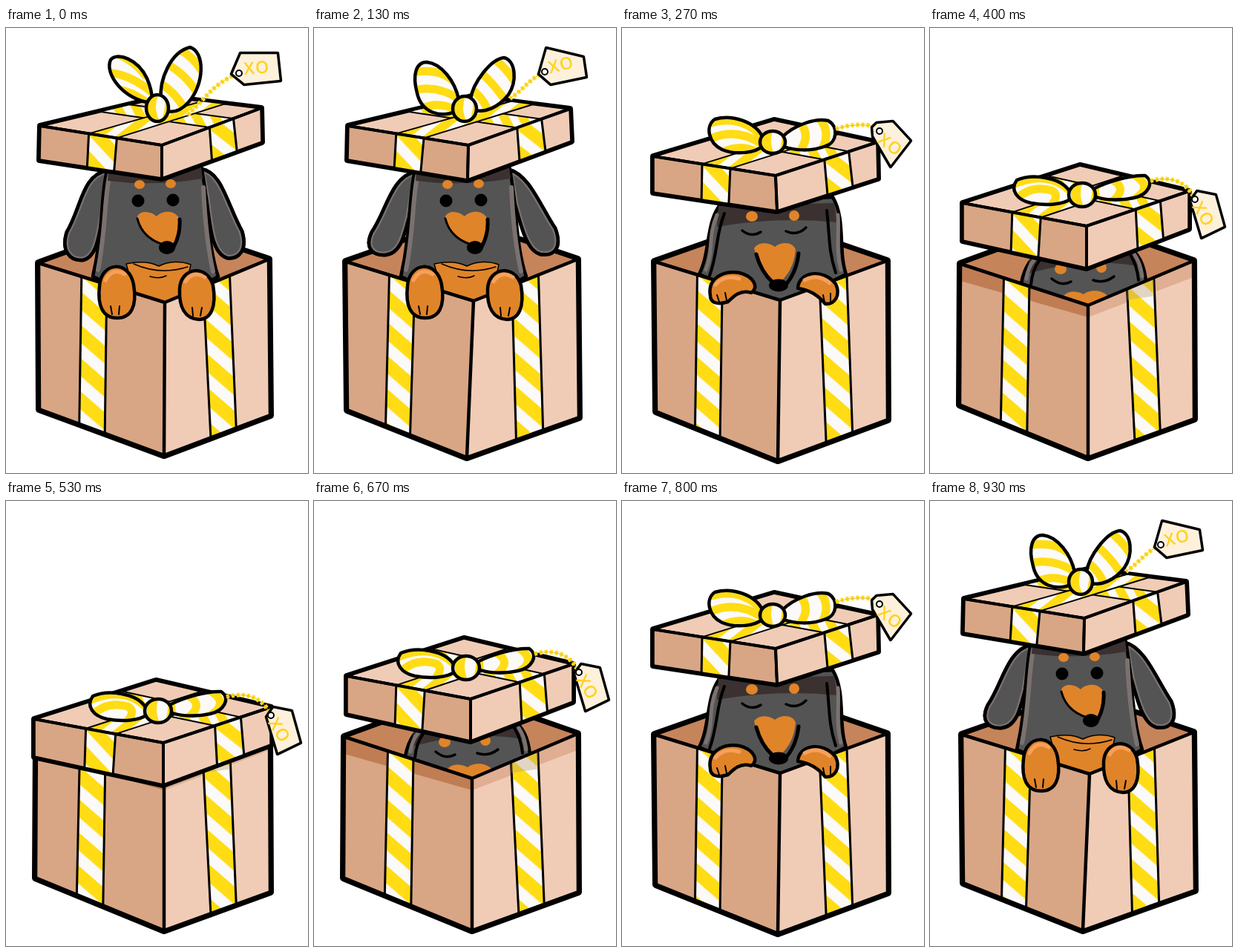
Recreate the animation shown at these times as an HTML page. Size 407 by 600 pixels, loop 1.07 s.

```html
<!DOCTYPE html>
<html lang="en">
<head>
<meta charset="utf-8">
<title>Puppy in a gift box</title>
<style>
html, body { margin: 0; width: 100%; height: 100%; overflow: hidden; background: #fff; }
svg { display: block; width: 100vw; height: 100vh; }
.pose { opacity: 0; animation: 1070ms step-end infinite; }
#tall { animation-name: tall; }
#up { animation-name: up; }
#sink { animation-name: sink; }
#peek { animation-name: peek; }
#shut { animation-name: shut; }
@keyframes tall { 0% { opacity: 1 } 12.149%, 100% { opacity: 0 } }
@keyframes up { 0% { opacity: 0 } 12.149% { opacity: 1 } 25.233% { opacity: 0 } 86.915%, 100% { opacity: 1 } }
@keyframes sink { 0% { opacity: 0 } 25.233% { opacity: 1 } 37.383% { opacity: 0 } 74.766% { opacity: 1 } 86.915%, 100% { opacity: 0 } }
@keyframes peek { 0% { opacity: 0 } 37.383% { opacity: 1 } 49.532% { opacity: 0 } 62.616% { opacity: 1 } 74.766%, 100% { opacity: 0 } }
@keyframes shut { 0% { opacity: 0 } 49.532% { opacity: 1 } 62.616%, 100% { opacity: 0 } }
</style>
</head>
<body>
<svg id="stage" viewBox="0 0 407 600" stroke-linejoin="round" stroke-linecap="round"></svg>
<script>
const C = {
  left: '#d8a685', right: '#f0ccb6', inside: '#c6845b', yellow: '#ffdc14', white: '#fbfaf8',
  coat: '#545454', shine: '#7b7270', dark: '#3a3130', tan: '#e0842a', glow: '#f6a05c', tag: '#fdf1dc'
};
let serial = 0;

const path = (d, fill, w = 4, stroke = '#000') =>
  `<path d="${d}" fill="${fill}" stroke="${stroke}" stroke-width="${w}"/>`;
const line = (d, w, stroke = '#000') => path(d, 'none', w, stroke);
const poly = (pts, fill, w) => path('M' + pts.join('L') + 'Z', fill, w);
const oval = (x, y, rx, ry, fill = '#000') =>
  `<ellipse cx="${x}" cy="${y}" rx="${rx}" ry="${ry}" fill="${fill}"/>`;
const mix = (a, b, t) => [a[0] + (b[0] - a[0]) * t, a[1] + (b[1] - a[1]) * t];

function clipped(d, inner) {
  const id = 'c' + serial++;
  return `<clipPath id="${id}"><path d="${d}"/></clipPath><g clip-path="url(#${id})">${inner}</g>`;
}

// Diagonal stripes anchored at the first corner of the quad
function ribbon(quad, angle, period, shift, w = 3) {
  const id = 's' + serial++, [x, y] = quad[0];
  return `<pattern id="${id}" width="40" height="${period}" patternUnits="userSpaceOnUse"
    patternTransform="translate(${x} ${y + shift}) rotate(${angle})">
    <rect width="40" height="${period}" fill="${C.white}"/>
    <rect width="40" height="${period * 0.54}" fill="${C.yellow}"/></pattern>` +
    poly(quad, `url(#${id})`, w);
}

// Ribbon across the strip between edge a-b and edge c-d
const strip = (a, b, c, d, [t0, t1, u0, u1], ...look) =>
  ribbon([mix(a, b, t0), mix(a, b, t1), mix(c, d, u1), mix(c, d, u0)], ...look);

function boxBack([L, F, R, LB, FB, RB]) {
  const back = [200, 260];
  return poly([L, back, R, RB, FB, LB], '#000', 10) + poly([L, back, R, F], C.inside, 4);
}

function boxFront([L, F, R, LB, FB, RB], shaded) {
  const down = ([x, y], n) => [x, y + n];
  let s = poly([L, F, FB, LB], C.left, 0) + poly([F, R, RB, FB], C.right, 0);
  if (shaded) {
    s += poly([L, F, down(F, 16), down(L, 23)], '#c07d54', 0) +
      poly([F, R, down(R, 22), down(F, 16)], '#dfae93', 0);
  }
  s += strip(L, F, LB, FB, [.34, .54, .32, .525], 41, 34, 21) +
    strip(F, R, FB, RB, [.37, .625, .44, .68], 41, 34, -4);
  if (shaded) {
    const a = mix(F, R, .37), b = mix(F, R, .625);
    s += `<path d="M${a}L${b}L${down(b, 25)}L${down(a, 15)}Z" fill="#b89a70" opacity=".38"/>`;
  }
  return s + line(`M${L}L${F}L${FB}L${LB}ZM${F}L${R}L${RB}L${FB}`, 4.5);
}

function lid([L, F, R, B, Lb, Fb, Rb]) {
  return poly([L, B, R, Rb, Fb, Lb], '#000', 8) +
    poly([L, B, R, F], C.right, 3.5) +
    strip(F, R, L, B, [.48, .72, .48, .72], 62, 22, 6, 2) +
    strip(L, F, B, R, [.4, .63, .4, .63], -38, 22, 4, 2) +
    poly([L, F, Fb, Lb], C.left, 3.5) + poly([F, R, Rb, Fb], C.right, 3.5) +
    strip(L, F, Lb, Fb, [.4, .63, .39, .61], 47, 31, 23) +
    strip(F, R, Fb, Rb, [.48, .72, .5, .75], 38, 31, 21) +
    line(`M${L}L${F}L${R}M${F}L${Fb}`, 4);
}

function bow(wings, [x, y, rx, ry]) {
  const wing = ([d, ...bands]) => path(d, C.white, 0) +
    clipped(d, bands.map(b => line(b, 11, C.yellow)).join('')) + line(d, 4.5);
  const knot = `M${x - rx},${y}a${rx},${ry} 0 1 1 ${2 * rx},0a${rx},${ry} 0 1 1 ${-2 * rx},0Z`;
  return wings.map(wing).join('') + path(knot, C.white, 0) +
    clipped(knot, line(`M${x - 4},${y - 22}Q${x - 14},${y} ${x - 2},${y + 22}`, 13, C.yellow) +
      line(`M${x + rx - 4},${y - 18}q5,12 -3,36`, 5, C.yellow)) + line(knot, 4.5);
}

function tag({ cord, shape, hole, text: [x, y, turn] }) {
  return `<path d="${cord}" fill="none" stroke="${C.yellow}" stroke-width="6" stroke-linecap="butt" stroke-dasharray="4 3"/>` +
    line(cord, 1, '#e3b63a') +
    poly(shape, '#000', 4.5) + poly(shape, C.tag, 2.5) +
    `<circle cx="${hole[0]}" cy="${hole[1]}" r="4" fill="#fff" stroke="#000" stroke-width="2"/>
    <text transform="translate(${x} ${y}) rotate(${turn})" y="8.5" text-anchor="middle"
      font-family="'Open Sans', 'Noto Sans', sans-serif" font-size="23" font-weight="600"
      letter-spacing="1.5" fill="#ffd21f">XO</text>`;
}

const sitting = ears => ears.map(d => path(d, C.coat, 5) +
    clipped(d, line(d, 9, C.shine)) + line(d, 4.5)).join('') +
  path('M137,188C127,222 132,270 117,335L175,362L214,372L240,362L286,335C271,292 273,230 263,186Z', C.coat, 4.5) +
  line('M140,196C132,230 135,270 124,326M266,215C268,260 271,292 279,328', 6, C.shine) +
  path('M138,190L263,188L265,203Q200,214 137,206Z', C.dark, 0) +
  oval(180, 211, 7, 6, C.tan) + oval(222, 210, 7, 6, C.tan) +
  oval(178, 233, 8.5, 8.5) + oval(225, 232, 8.5, 8.5) +
  path('M177,254C182,245 195,247 203,254C211,246 226,245 233,256C235,272 231,286 220,296C200,291 182,276 177,254Z', C.tan, 0) +
  line('M177,257C182,277 196,287 212,292', 3) +
  line('M234,258C235,272 232,284 226,295', 5) + oval(217, 296, 11, 9) +
  path('M162,318C180,314 194,315 206,321C220,314 236,314 249,319Q244,340 241,362L214,372L174,360Z', C.tan, 1.5) +
  line('M172,318Q208,334 245,322M194,335Q207,339 216,334', 1.5);

const bigPaws = [
  ['M126,348C128,315 166,312 172,346C177,376 168,391 150,391C130,391 123,374 126,348Z',
    'M134,340Q144,322 160,332', 'M141,375L143,386M153,375L152,386'],
  ['M234,352C235,322 271,318 279,347C284,376 276,393 260,393C241,392 233,376 234,352Z',
    'M242,342Q252,326 268,336', 'M251,377L252,388M264,377L262,388']
];
const smallPaws = [
  ['M119,361C115,339 135,326 158,330C178,335 185,350 174,357C160,352 150,362 143,369C128,374 119,370 119,361Z',
    'M126,346Q138,332 158,338', 'M128,360L131,369M139,357L141,367'],
  ['M237,351C238,328 272,324 288,345C295,360 287,373 274,372C265,361 253,353 237,351Z',
    'M246,340Q264,330 280,344', 'M271,360L273,370M281,358L281,368']
];
const paws = list => list.map(([d, glow, toes]) =>
  path(d, C.tan, 4.5) + line(glow, 5, C.glow) + line(toes, 2)).join('');

const sinking =
  path('M134,236C112,262 120,300 104,332L160,356L213,370L262,352L302,332C291,300 302,258 284,228Z', C.coat, 4.5) +
  path('M130,240L286,236L290,262Q210,254 128,268Z', C.dark, 0) +
  line('M128,252C115,282 124,300 113,326M291,252C293,280 288,300 295,326', 5, C.shine) +
  line('M138,250C126,280 130,300 118,334M276,246C280,280 278,300 288,330', 4) +
  oval(175, 254, 8, 7, C.tan) + oval(232, 253, 7, 7, C.tan) +
  line('M162,273Q174,283 187,275M221,274Q236,281 248,269', 3.5) +
  path('M178,297C184,288 198,289 206,295C216,287 231,289 234,299C232,321 222,336 212,343C196,338 184,320 178,297Z', C.tan, 0) +
  line('M181,305Q187,328 203,343M238,304Q235,330 220,347', 5) + oval(211, 347, 13, 8.5);

const peeking =
  path('M122,352C124,330 132,312 150,300L270,296C286,310 290,326 292,350L213,390Z', C.coat, 4.5) +
  path('M134,312L276,304L286,322Q210,308 130,332Z', C.dark, 0) +
  line('M130,338Q132,322 141,312M286,335Q284,318 276,306', 5, C.shine) +
  line('M136,346Q138,326 147,314M281,340Q279,320 270,306', 4) +
  oval(176, 325, 8, 7, C.tan) + oval(231, 323, 7, 7, C.tan) +
  line('M164,338Q177,349 190,342M220,340Q235,345 248,335', 3.5) +
  path('M178,364C184,353 198,354 207,359C216,352 232,353 239,361L214,385Z', C.tan, 0);

const lowBow = y => bow([
  [`M188,${y - 5}C176,${y - 24} 138,${y - 29} 117,${y - 20}C107,${y - 6} 118,${y + 7} 136,${y + 11}C158,${y + 15} 180,${y + 13} 190,${y + 5}Z`,
    `M112,${y - 14}Q158,${y - 34} 188,${y - 6}`, `M116,${y + 6}Q136,${y - 14} 164,${y - 6}Q176,${y} 162,${y + 16}`],
  [`M220,${y - 8}C240,${y - 18} 270,${y - 27} 290,${y - 26}C303,${y - 17} 294,${y} 275,${y + 4}C252,${y + 9} 232,${y + 6} 221,${y + 2}Z`,
    `M274,${y - 28}Q304,${y - 10} 272,${y + 8}`, `M246,${y - 20}Q268,${y - 8} 244,${y + 10}`, `M222,${y - 12}L224,${y + 8}`]
], [205, y, 18, 16]);

const lowTag = dy => tag({
  cord: `M297,${206 + dy}C320,${200 + dy} 344,${204 + dy} 356,${229 + dy}`,
  shape: [[360, 220 + dy], [385, 225 + dy], [397, 268 + dy], [366, 283 + dy], [351, 233 + dy]],
  hole: [357, 231 + dy], text: [369, 251 + dy, 58]
});

const poses = {
  tall: {
    box: [[44, 317], [214, 370], [354, 312], [45, 514], [213, 576], [356, 522]],
    dog: sitting([
      'M137,192C102,198 102,242 82,275C74,300 86,314 103,313C122,310 125,280 130,255Q134,220 137,192Z',
      'M263,190C291,194 298,238 318,274C326,300 313,312 298,310C276,303 275,262 270,230Z'
    ]), paws: bigPaws,
    lid: [[46, 132], [210, 158], [344, 108], [213, 92], [45, 178], [210, 203], [345, 154]],
    bow: bow([
      ['M196,101C160,98 132,62 141,43C150,32 178,42 190,68Q197,84 197,98Z',
        'M152,36Q172,44 188,64', 'M136,60Q168,62 198,88', 'M144,82Q170,84 194,104'],
      ['M209,97C206,70 222,32 248,26C268,32 268,75 246,100Q232,116 216,112Z',
        'M232,28Q252,38 264,58', 'M216,48Q242,62 258,88', 'M206,74Q226,84 240,108']
    ], [204, 108, 15, 18]),
    tag: tag({
      cord: 'M312,62C280,74 268,96 244,118',
      shape: [[316, 34], [366, 34], [370, 71], [321, 76], [304, 62]],
      hole: [314, 61], text: [338, 53, -5]
    })
  },
  up: {
    box: [[43, 315], [215, 368], [355, 312], [45, 515], [206, 579], [357, 525]],
    dog: sitting([
      'M137,194C104,200 98,246 78,275C68,295 78,307 96,306C118,304 122,276 128,255Q133,224 137,194Z',
      'M263,191C290,198 305,240 325,270C335,296 324,308 305,305C287,300 280,270 271,238Z'
    ]), paws: bigPaws,
    lid: [[46, 132], [208, 158], [345, 109], [213, 92], [45, 178], [207, 205], [347, 153]],
    bow: bow([
      ['M192,112C170,122 145,114 139,88C132,62 138,46 152,46C172,48 190,72 195,96Z',
        'M134,60Q166,54 186,70', 'M134,84Q166,76 196,96', 'M146,108Q170,98 194,112'],
      ['M211,96C214,74 238,42 256,40C272,44 274,72 262,90C248,108 230,114 217,111Z',
        'M240,40Q256,50 272,74', 'M222,58Q240,72 258,98', 'M208,80Q226,90 236,114']
    ], [203, 109, 16, 17]),
    tag: tag({
      cord: 'M311,60C292,66 282,84 264,95',
      shape: [[313, 27], [363, 39], [367, 66], [319, 76], [303, 62]],
      hole: [311, 59], text: [333, 49, -14]
    })
  },
  sink: {
    box: [[44, 315], [213, 367], [357, 314], [46, 517], [210, 583], [358, 528]],
    dog: sinking, paws: smallPaws,
    lid: [[42, 173], [207, 199], [344, 154], [205, 124], [42, 222], [209, 247], [345, 203]],
    bow: bow([
      ['M190,148C180,126 148,116 125,123C112,132 116,155 135,164C155,172 180,168 190,159Z',
        'M114,130Q158,114 188,146', 'M114,152Q150,132 188,156', 'M136,167Q160,156 182,167'],
      ['M216,147C232,131 260,121 278,125C292,133 290,154 275,159C255,167 232,165 218,160Z',
        'M264,120Q284,140 268,166', 'M240,128Q256,146 238,168']
    ], [203, 154, 17, 15]),
    tag: tag({
      cord: 'M288,136Q320,126 346,134',
      shape: [[337, 134], [343, 128], [365, 126], [389, 152], [362, 187], [338, 146]],
      hole: [347, 139], text: [362, 157, 36]
    })
  },
  peek: {
    box: [[41, 318], [213, 374], [355, 314], [40, 508], [213, 579], [356, 527]],
    dog: peeking, shaded: true,
    lid: [[44, 236], [211, 267], [349, 220], [202, 185], [44, 287], [211, 324], [349, 271]],
    bow: lowBow(225), tag: lowTag(0)
  },
  shut: {
    box: [[41, 318], [213, 374], [355, 314], [40, 508], [213, 579], [356, 527]],
    dog: '', shaded: true,
    lid: [[38, 294], [212, 326], [357, 278], [202, 242], [38, 345], [212, 383], [357, 329]],
    bow: lowBow(283), tag: lowTag(58)
  }
};

document.getElementById('stage').innerHTML = Object.entries(poses).map(([id, p]) =>
  `<g class="pose" id="${id}">` + boxBack(p.box) + p.dog + boxFront(p.box, p.shaded) +
  paws(p.paws || []) + lid(p.lid) + p.bow + p.tag + '</g>').join('');
</script>
</body>
</html>
```
